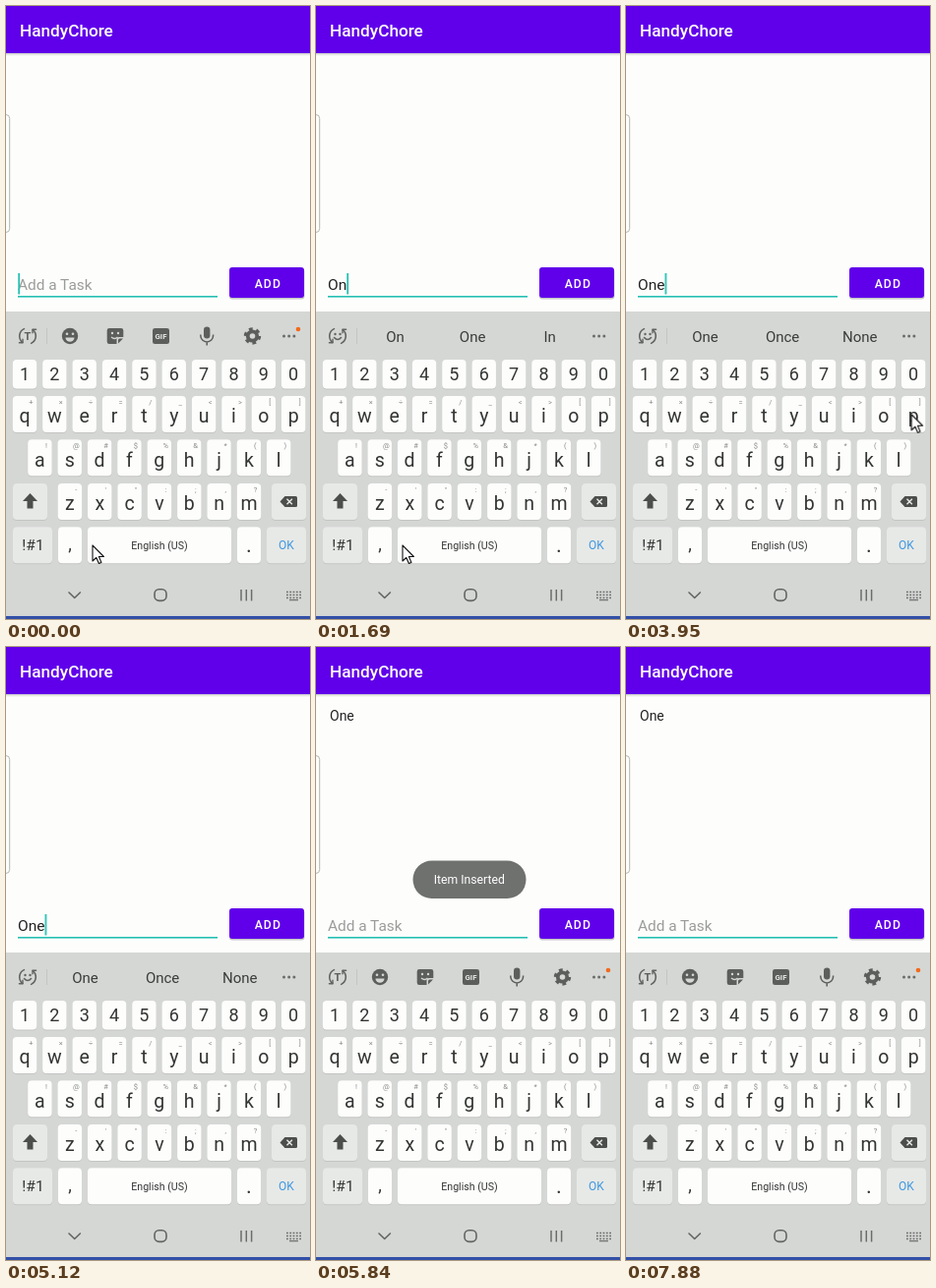
These frames come from a looping animation (309x624 px, 8000 ms). An HTML page:

```html
<!DOCTYPE html>
<html lang="en">
<head>
<meta charset="utf-8">
<title>HandyChore</title>
<style>
html, body { margin: 0; width: 100%; height: 100%; overflow: hidden; background: #fdfefc; }
svg { display: block; width: 100%; height: 100%; font-family: Roboto, Arial, sans-serif; }
.mid { text-anchor: middle; }
.key { fill: #fdfefc; }
.dim { fill: #e7e9e7; }
.glyph { fill: #333533; text-anchor: middle; }
.hint { fill: #8a8c8a; font-size: 7.5px; text-anchor: middle; }
.line { fill: none; stroke: #626462; stroke-width: 1.6; stroke-linecap: round; stroke-linejoin: round; }
.field { font-size: 15.5px; fill: #222; }
.word { font-size: 15px; fill: #3a3c3a; text-anchor: middle; }

.step, .caret, #pos { animation: 8s step-end infinite; }
.idle { animation-name: idle; }
.typing { animation-name: typing; }
.w1 { animation-name: w1; }
.w2 { animation-name: w2; }
.w3 { animation-name: w3; }
.done { animation-name: done; }
.caret { animation-name: blink; }
#pos { animation-name: advance; }
#toast { animation: toast 8s linear infinite; }
#mouse { animation: leave 8s linear infinite; }
#ripple { animation: ripple 8s linear infinite; }

@keyframes idle { 0%, 67.5%, 100% { opacity: 1; } 10.875% { opacity: 0; } }
@keyframes typing { 0%, 67.5%, 100% { opacity: 0; } 10.875% { opacity: 1; } }
@keyframes w1 { 0%, 21.125%, 100% { opacity: 0; } 10.875% { opacity: 1; } }
@keyframes w2 { 0%, 24.625%, 100% { opacity: 0; } 21.125% { opacity: 1; } }
@keyframes w3 { 0%, 67.5%, 100% { opacity: 0; } 24.625% { opacity: 1; } }
@keyframes done { 0%, 100% { opacity: 0; } 67.5% { opacity: 1; } }
@keyframes blink {
  0%, 10.875%, 21.125%, 35.75%, 48.125%, 60.125%, 79.375%, 93.125% { opacity: 1; }
  3.75%, 16.25%, 30%, 42.25%, 54.75%, 73%, 86.125%, 98.5%, 100% { opacity: 0; }
}
@keyframes advance {
  0%, 67.5%, 100% { transform: none; }
  10.875% { transform: translateX(10.4px); }
  21.125% { transform: translateX(19px); }
  24.625% { transform: translateX(27.3px); }
}
@keyframes toast {
  0%, 69%, 98.4%, 100% { opacity: 0; }
  73% { opacity: .93; }
  74.5%, 93.5% { opacity: 1; }
}
@keyframes leave {
  0%, 43.2% { transform: translate(88px, 549px); animation-timing-function: ease-in-out; }
  51.2%, 100% { transform: translate(314px, 400px); }
}
@keyframes ripple {
  0%, 65.8% { opacity: 0; }
  67.2%, 68.5% { opacity: .18; }
  72.5%, 100% { opacity: 0; }
}
</style>
</head>
<body>
<svg viewBox="0 0 309 624" xmlns="http://www.w3.org/2000/svg">
  <defs>
    <linearGradient id="fade" x2="0" y2="1">
      <stop stop-color="#000" stop-opacity=".2"/>
      <stop offset="1" stop-color="#000" stop-opacity="0"/>
    </linearGradient>
    <g id="cycle" class="line">
      <path d="M-5.2 6.4A8.2 8.2 0 0 1-3.6-7.4M5.2-6.4A8.2 8.2 0 0 1 3.6 7.4"/>
      <path d="M-8.6 6.8h3.6V3.2M8.6-6.8H5v3.6" stroke-width="1.4"/>
    </g>
  </defs>

  <rect width="309" height="624" fill="#fdfefc"/>
  <rect y="48" width="309" height="3" fill="url(#fade)"/>
  <rect width="309" height="48" fill="#6000ea"/>
  <text x="14" y="31" font-size="17.2" font-weight="500" fill="#fff">HandyChore</text>
  <rect x="-10" y="110.5" width="13.7" height="120" rx="4" fill="#fdfefc" stroke="#b3b5b3"/>

  <text class="step done" x="14" y="74.5" font-size="14" fill="#222">One</text>

  <g class="field">
    <text class="step idle" x="12" y="289" font-size="15.4" fill="#9a9c9a">Add a Task</text>
    <text class="step w1" x="12" y="289">O</text>
    <text class="step w2" x="12" y="289">On</text>
    <text class="step w3" x="12" y="289">One</text>
  </g>
  <rect x="12" y="295" width="203" height="1.6" fill="#25bfb3"/>
  <g id="pos"><rect class="caret" x="12.3" y="272" width="1.8" height="21.5" fill="#25bfb3"/></g>

  <rect x="227" y="267.5" width="76.5" height="31" rx="3" fill="#000" opacity=".22"/>
  <rect x="227" y="266" width="76" height="31" rx="3" fill="#6000ea"/>
  <rect id="ripple" x="227" y="266" width="76" height="31" rx="3" fill="#fff"/>
  <text class="mid" x="266.3" y="286.5" font-size="12.2" font-weight="500" letter-spacing="1.1" fill="#fff">ADD</text>

  <g id="toast">
    <rect x="98.5" y="217.5" width="115" height="38.5" rx="19.2" fill="#656765"/>
    <text class="mid" x="155.8" y="240.5" font-size="12.2" fill="#fff">Item Inserted</text>
  </g>

  <rect y="311" width="309" height="310" fill="#d5d7d5"/>
  <path d="M41.5 328v16" stroke="#c3c5c3"/>
  <use href="#cycle" x="22" y="336"/>

  <g class="step idle" fill="#5c5e5c">
    <text class="mid" x="22" y="340" font-size="11" font-weight="700">T</text>
    <circle cx="65" cy="336" r="8.2"/>
    <circle cx="62" cy="333.7" r="1.3" fill="#d5d7d5"/>
    <circle cx="68" cy="333.7" r="1.3" fill="#d5d7d5"/>
    <path d="M60.5 337.5h9a4.5 4.3 0 0 1-9 0z" fill="#d5d7d5"/>
    <path d="M105 328h12a2.3 2.3 0 0 1 2.3 2.3v6.7h-4.300a2.500 2.500 0 0 0-2.500 2.500v4.500H105a2.300 2.300 0 0 1-2.300-2.300v-11.400A2.300 2.300 0 0 1 105 328z"/>
    <path d="M114 343.500v-3.500a1.500 1.500 0 0 1 1.500-1.500h3.500z"/>
    <circle cx="108" cy="333" r="1.2" fill="#d5d7d5"/>
    <circle cx="114" cy="333" r="1.2" fill="#d5d7d5"/>
    <path d="M107 337q3.500 3 6.500 0" fill="none" stroke="#d5d7d5" stroke-width="1.300"/>
    <rect x="149" y="328" width="17" height="16" rx="2.3"/>
    <text class="mid" x="157.500" y="339" font-size="7.800" font-weight="700" fill="#e9ebe9">GIF</text>
    <rect x="201" y="326.500" width="6.400" height="12" rx="3.200"/>
    <path d="M197.800 334.500v1a6.400 6.400 0 0 0 12.800 0v-1M204.200 342v3.500" fill="none" stroke="#5c5e5c" stroke-width="1.500"/>
    <circle cx="250.500" cy="336" r="6.600"/>
    <circle cx="250.500" cy="336" r="7.200" fill="none" stroke="#5c5e5c" stroke-width="3" stroke-dasharray="3.770"/>
    <circle cx="250.500" cy="336" r="2.800" fill="#d5d7d5"/>
    <circle cx="297" cy="329" r="2.300" fill="#f26a1b"/>
  </g>

  <g class="step typing">
    <circle cx="19.500" cy="334" r="1.200" fill="#626462"/>
    <circle cx="24.500" cy="334" r="1.200" fill="#626462"/>
    <path class="line" d="M18.500 337.500q3.500 4 7 0" stroke-width="1.400"/>
  </g>
  <g id="words"></g>
  <g fill="#6a6c6a">
    <circle cx="282.500" cy="336" r="1.500"/><circle cx="287.700" cy="336" r="1.500"/><circle cx="292.900" cy="336" r="1.500"/>
  </g>

  <g id="keys"></g>

  <path d="M24.500 496l7.500 8h-4.500v7.500h-6V504H17z" fill="#4c4e4c"/>
  <path d="M283.500 499h11a1.500 1.500 0 0 1 1.500 1.500v8a1.500 1.500 0 0 1-1.500 1.500h-11l-5-5.500z" fill="#4c4e4c"/>
  <path d="M285.500 501.800l5.400 5.400m0-5.400l-5.400 5.400" stroke="#e7e9e7" stroke-width="1.400"/>

  <path class="line" d="M64 597l5.700 5.500 5.700-5.500"/>
  <rect class="line" x="151" y="593.800" width="12" height="11.600" rx="4.600" stroke-width="1.400"/>
  <path d="M239 594v11.500M244.300 594v11.500M249.600 594v11.500" stroke="#6b6d6b" stroke-width="1.500"/>
  <path d="M285 596.500h15M285 599.500h15M285 602.500h15" stroke="#6b6d6b" stroke-width="1.700" stroke-dasharray="1.800 1.500"/>
  <path d="M288 604.700h9" stroke="#6b6d6b" stroke-width="1.200"/>
  <rect y="621" width="309" height="3" fill="#3350a8"/>

  <g id="mouse">
    <path d="M0 0V16L3.800 12.500 6.400 18.500 8.900 17.400 6.400 11.500H11.400Z" fill="#fff" stroke="#111" stroke-width="1.100" stroke-linejoin="round"/>
  </g>
</svg>
<script>
const NS = "http://www.w3.org/2000/svg";
const keys = document.getElementById("keys");
const words = document.getElementById("words");

function add(parent, tag, attrs, text) {
  const el = document.createElementNS(NS, tag);
  for (const name in attrs) el.setAttribute(name, attrs[name]);
  if (text) el.textContent = text;
  parent.append(el);
}

function key(x, y, width, height, dim) {
  add(keys, "rect", { x, y, width, height: height + 1, rx: 4, fill: "#c3c5c3" });
  add(keys, "rect", { x, y, width, height, rx: 4, class: dim ? "dim" : "key" });
}

function label(text, x, y, size, color = "#333533") {
  add(keys, "text", { x, y, class: "glyph", style: `font-size:${size}px;fill:${color}` }, text);
}

function row(chars, hints, x0, top, height, base, size) {
  [...chars].forEach((c, i) => {
    const x = x0 + i * 30.35;
    key(x - 12.2, top, 24.4, height);
    label(c, x, base, size);
    if (hints[i]) add(keys, "text", { x: x + 6.5, y: top + 9, class: "hint" }, hints[i]);
  });
}

row("1234567890", "", 19, 360, 29.5, 381.3, 18);
row("qwertyuiop", "+×÷=/_<>[]", 19, 397, 37, 424, 19.5);
row("asdfghjkl", "!@#$%&*()", 34.4, 441.3, 37, 469, 19.5);
row("zxcvbnm", "-'\":;,?", 64.9, 486, 37, 513, 19.5);

key(7, 486, 35, 37, true);
key(270, 486, 35, 37, true);
key(7, 530.3, 40, 37, true);
key(53, 530.3, 24, 37);
key(83, 530.3, 146, 37);
key(235, 530.3, 24, 37);
key(265, 530.3, 40, 37, true);
label("!#1", 27.5, 554, 15.5);
label(",", 65, 554, 18);
label("English (US)", 156, 552.5, 10.6);
label(".", 247, 556, 22);
label("OK", 285, 553, 12, "#3f97e0");

[["O", "Of", "I"], ["On", "One", "In"], ["One", "Once", "None"]].forEach((set, n) =>
  set.forEach((word, i) =>
    add(words, "text", { x: 80.5 + i * 78.6, y: 342, class: `word step w${n + 1}` }, word)));
</script>
</body>
</html>
```
